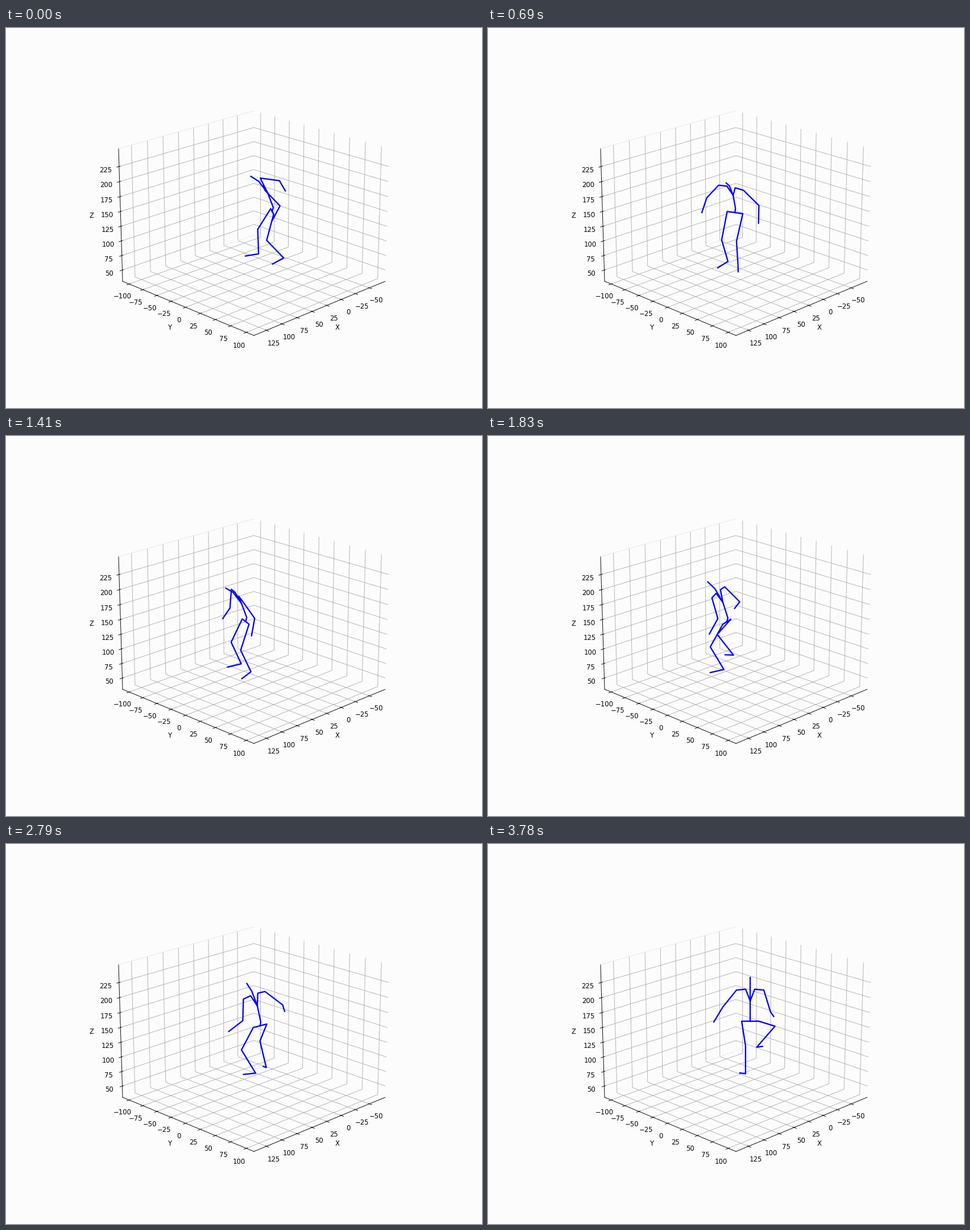
Write a matplotlib script that moves like this. It is 837x669 px and loops after 3.81 s.

```python
import numpy as np
import matplotlib.pyplot as plt
from matplotlib.animation import FuncAnimation

W, H, DPI = 837, 669, 83.7
FRAMES, STEP = 127, 30
BG = "#fcfcfc"
TILT = np.sin(np.radians(20))  # camera looks down by 20 degrees

# The dance: a path, a turn and the swing of each bone, in pixels and degrees.
# A heading of 0 faces the viewer; a swing of 0 hangs down, positive to the right.
KEY_TIMES = [0, 420, 990, 1830, 2370, 3240, 3780]
DANCE = dict(
    x=[468, 447, 425, 420, 424, 469, 461],
    y=[323, 324, 326, 327, 320, 320, 312],
    heading=[80, 24, 24, 118, 132, 155, 180],
    right_arm=[82, -32, -48, 45, 53, 52, 17],
    right_forearm=[30, -2, -30, -38, -48, 90, 35],
    left_arm=[44, 44, 47, 16, -3, 0, -39],
    left_forearm=[-28, -4, 0, -29, -53, -51, -31],
    right_thigh=[-32, -15, -9, -42, -14, -31, 73],
    right_shin=[2, 20, 12, 38, 18, 8, -41],
    left_thigh=[-15, -17, -8, -29, -31, -20, 9],
    left_shin=[44, -3, 15, 31, 18, 46, 0],
)


def smooth(values):
    """Return a function of time through the key values, without overshoot."""
    t, p = np.array(KEY_TIMES, float), np.array(values, float)
    h = np.diff(t)
    d = np.diff(p) / h
    a, b = d[:-1], d[1:]
    same = a * b > 0
    slope = np.concatenate([
        d[:1], np.where(same, 2 * a * b / np.where(same, a + b, 1), 0), d[-1:]])

    def at(ms):
        i = int(np.clip(np.searchsorted(t, ms, "right") - 1, 0, len(h) - 1))
        u = (ms - t[i]) / h[i]
        ease = u * u * (3 - 2 * u)
        pull = u * (1 - u) ** 2 * slope[i] - u * u * (1 - u) * slope[i + 1]
        return p[i] + ease * (p[i + 1] - p[i]) + h[i] * pull

    return at


DANCE = {name: smooth(values) for name, values in DANCE.items()}


def forward(heading):
    a = np.radians(heading)
    return np.array([-np.sin(a), TILT * np.cos(a)])


def sideways(heading, width, depth):
    a = np.radians(heading)
    return np.array([width * np.cos(a), depth * np.sin(a)])


def bone(length, swing):
    a = np.radians(swing)
    return length * np.array([np.sin(a), np.cos(a)])


def chain(start, *steps):
    return np.cumsum([start, *steps], axis=0)


def figure_lines(ms):
    """Joint chains of the trunk, both arms and both legs."""
    now = {name: f(ms) for name, f in DANCE.items()}
    turn = now["heading"]
    root = np.array([now["x"], now["y"]])

    def above_root(lean, height):
        return root + lean * forward(turn) - [0, height]

    chest = above_root(8, 33)
    shoulders = above_root(17, 49)
    parts = [np.array([above_root(38, 64), above_root(24, 54.5), chest,
                       above_root(-2, 7), root])]

    # bones tilted to or from the camera change length as the body turns away
    away = (1 - np.cos(np.radians(turn))) / 2
    shin = 39 + 10 * away
    sizes = {  # upper arm, forearm, thigh
        "right": (30 + 10 * away, 28 - 18 * away, 52 - 22 * away),
        "left": (38, 31, 50 - 6 * away),
    }
    for name, side in (("right", -1), ("left", 1)):
        arm, forearm, thigh = sizes[name]
        reach = side * sideways(turn, 24, 11)
        shoulder = shoulders + reach
        collar = shoulders + reach / 3 - [0, 1.5]
        limb = chain(shoulder, bone(arm, now[name + "_arm"]),
                     bone(forearm, now[name + "_forearm"]))
        parts.append(np.vstack([chest, collar, limb]))

        foot = 24 * forward(turn - side * 25) + [0, 6]
        parts.append(chain(root, side * sideways(turn, 15, 5),
                           bone(thigh, now[name + "_thigh"]),
                           bone(shin, now[name + "_shin"]), foot))
    return parts


def draw_room(fig):
    x0, x1 = -79.2, 144.8
    y0, y1 = -112, 112
    z0, z1 = 30.5, 254.5
    ax = fig.add_subplot(projection="3d")
    ax.set_facecolor(BG)
    ax.view_init(elev=20, azim=45)
    for axis in (ax.xaxis, ax.yaxis, ax.zaxis):
        axis.set_pane_color(BG)
    # faint edges of the left wall
    ax.plot([x0, x1], [y0, y0], [z1, z1], color="#e8e8e8", lw=0.9)
    ax.plot([x0, x0 + 50], [y0, y0], [z0, z0], color="#ececec", lw=0.9)
    ax.set(xlabel="X", ylabel="Y", zlabel="Z",
           xticks=range(-50, 126, 25), yticks=range(-100, 101, 25),
           zticks=range(50, 226, 25))
    ax.set_xlim(x0, x1)
    ax.set_ylim(y0, y1)
    ax.set_zlim(z0, z1)


fig = plt.figure(figsize=((W + 0.01) / DPI, (H + 0.01) / DPI), dpi=DPI,
                 facecolor=BG)
draw_room(fig)

stage = fig.add_axes([0, 0, 1, 1])
stage.set(xlim=(0, W), ylim=(H, 0))
stage.axis("off")
lines = [stage.plot([], [], color="#0000ff", lw=2)[0] for _ in range(5)]


def update(n):
    for line, points in zip(lines, figure_lines(n * STEP)):
        line.set_data(points.T)
    return lines


anim = FuncAnimation(fig, update, frames=FRAMES, interval=STEP,
                     repeat=True, repeat_delay=0, blit=False)
plt.show()
```
